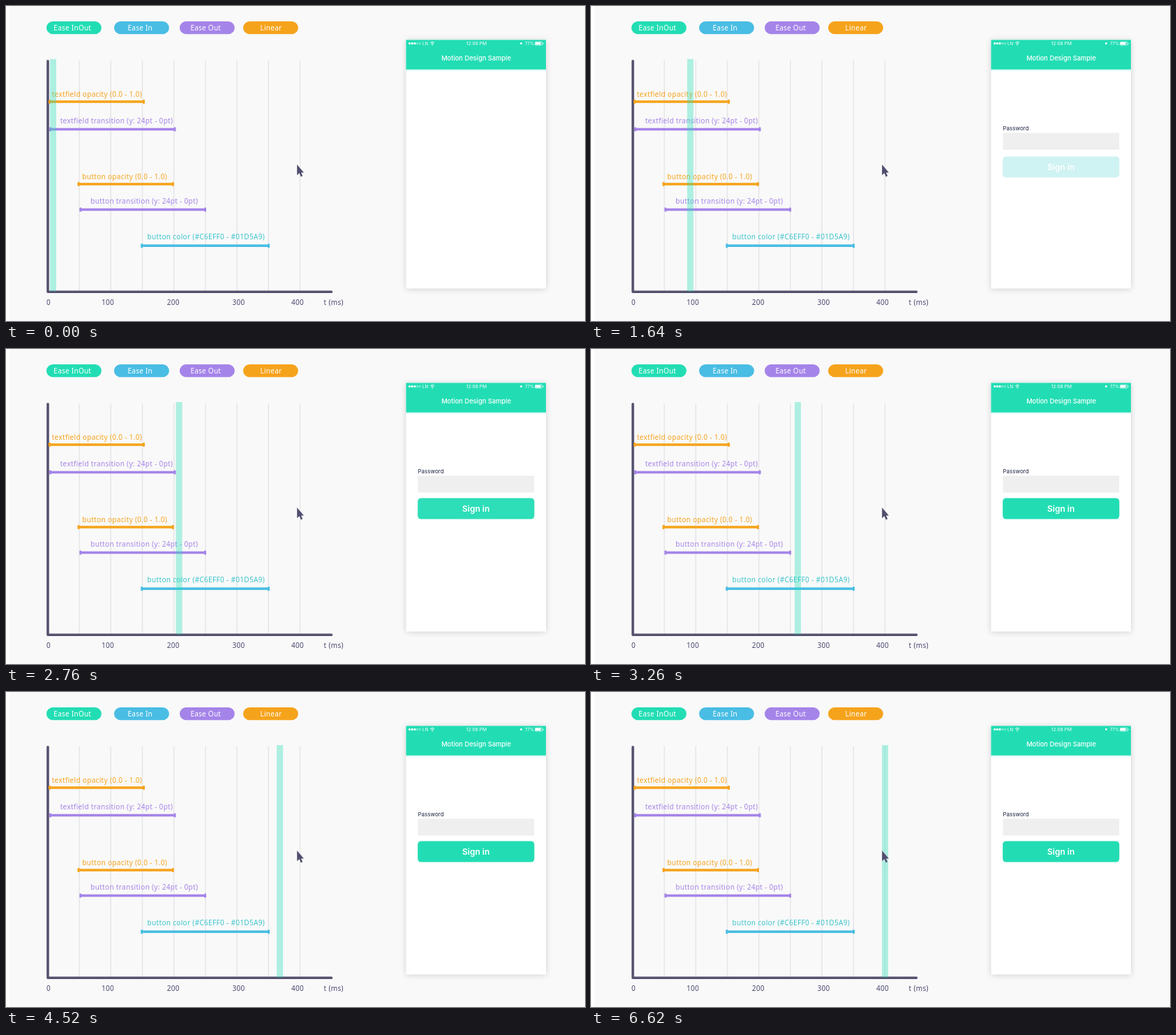
Write an HTML page that moves like this. It is 830 px wide and 451 px high and loops after 6640 ms.

```html
<!DOCTYPE html>
<html lang="en">
<head>
<meta charset="utf-8">
<title>Motion timeline</title>
<style>
  html, body { margin: 0; width: 100%; height: 100%; overflow: hidden; background: #fff; }
  svg { display: block; width: 830px; height: 451px; }
  text { white-space: pre; }
  .chart text { font: 400 10px "Noto Sans", "Open Sans", sans-serif; letter-spacing: .32px; }
  .chart .pill { font-weight: 500; letter-spacing: .25px; text-anchor: middle; fill: #fff; }
  .phone text { font-family: Inter, Roboto, sans-serif; }
  .phone .status { font-size: 6.7px; fill: #fff; }
  .card { filter: drop-shadow(0 1px 4px rgba(0, 0, 0, .16)); }
</style>
</head>
<body>
<svg viewBox="0 0 830 451">
  <rect x="5" width="825" height="451" fill="#f9f9f9"/>
  <g class="chart" id="chart"></g>

  <g class="phone">
    <rect class="card" x="573.5" y="48.5" width="200.5" height="356" fill="#fff"/>
    <rect x="573.5" y="90" width="200.5" height="3" fill="#22ddb4" opacity=".15"/>
    <rect x="573.5" y="48.5" width="200.5" height="42.3" fill="#22ddb4"/>
    <g fill="#fff" id="dots"></g>
    <text class="status" x="597" y="55.8" style="font-size:6.2px">LN</text>
    <g fill="none" stroke="#fff" stroke-width="1">
      <path d="M608.3 52.6q2.9-2.6 5.8 0M609.5 54.2q1.7-1.5 3.4 0"/>
    </g>
    <circle cx="611.2" cy="55.6" r=".8" fill="#fff"/>
    <text class="status" x="674.5" y="56" text-anchor="middle">12:08 PM</text>
    <circle cx="738.5" cy="53.5" r="1.5" fill="#fff"/>
    <text class="status" x="744" y="56" style="font-size:6.2px">77%</text>
    <rect x="758.4" y="51.4" width="10.4" height="4.6" rx="1" fill="none" stroke="#fff" stroke-width=".7"/>
    <rect x="759" y="52" width="7.6" height="3.4" fill="#fff"/>
    <rect x="769.6" y="52.8" width="1" height="1.8" fill="#fff"/>
    <text x="674" y="78.3" text-anchor="middle" font-size="9.3" font-weight="500" fill="#fff">Motion Design Sample</text>

    <g id="field">
      <text x="590.5" y="178" font-size="8" fill="#1c2340">Password</text>
      <rect x="590.5" y="181.5" width="166.7" height="24" fill="#efefef"/>
    </g>
    <g id="button">
      <rect id="face" x="590.2" y="213.4" width="167.2" height="30.2" rx="5"/>
      <text x="673.7" y="233" text-anchor="middle" font-size="12" font-weight="600" fill="#fff">Sign in</text>
    </g>
  </g>

  <rect id="head" y="76" width="9" height="332.5" fill="#22ddb4" opacity=".35"/>
  <path d="M417.2 227V242.2L420.5 239.3L422.8 244.4L425.2 243.3L423 238.5H427Z"
        fill="#504e6e" stroke="#fff" stroke-width="1" paint-order="stroke"/>
</svg>

<script>
const LOOP = 6640;
const TEAL = "#22ddb4", BLUE = "#49bde4", PURPLE = "#a584e9", ORANGE = "#f6a31c", INK = "#54526f";
const $ = id => document.getElementById(id);

function add(parent, tag, attrs, text) {
  const el = document.createElementNS("http://www.w3.org/2000/svg", tag);
  for (const key in attrs) el.setAttribute(key, attrs[key]);
  if (text) el.textContent = text;
  parent.append(el);
}

function drawChart() {
  const g = $("chart");
  const pills = [
    [58, 95.3, TEAL, "Ease InOut"], [155, 192.3, BLUE, "Ease In"],
    [249, 286.3, PURPLE, "Ease Out"], [340, 380, ORANGE, "Linear"]
  ];
  for (const [x, mid, fill, label] of pills) {
    add(g, "rect", { x, y: 22, width: 78.8, height: 18.3, rx: 9.15, fill });
    add(g, "text", { class: "pill", x: mid, y: 34.8 }, label);
  }

  for (let i = 0; i < 8; i++) {
    add(g, "rect", { x: 104.3 + i * 45.2, y: 78, width: 1.5, height: 330, fill: "#e6e6e8" });
  }
  add(g, "path", { d: "M60 78.8V409.3H466.5", fill: "none", stroke: INK,
    "stroke-width": 3.6, "stroke-linecap": "round", "stroke-linejoin": "round" });

  const ticks = [[58, "0"], [137, "100"], [230.7, "200"], [324.4, "300"], [409, "400"], [455.6, "t (ms)"]];
  for (const [x, label] of ticks) add(g, "text", { x, y: 428.4, fill: "#4a4870" }, label);

  const tracks = [
    [61, 199, 137, ORANGE, 65.7, 129.5, "textfield opacity (0.0 - 1.0)"],
    [62, 243.5, 176.5, PURPLE, 77.7, 167.5, "textfield transition (y: 24pt - 0pt)"],
    [102.5, 240.8, 255, ORANGE, 109.3, 247.6, "button opacity (0.0 - 1.0)"],
    [105.3, 287, 291.5, PURPLE, 121.2, 282.6, "button transition (y: 24pt - 0pt)"],
    [193.2, 378, 343.2, BLUE, 202.6, 334.4, "button color (#C6EFF0 - #01D5A9)"]
  ];
  for (const [from, to, y, fill, x, base, label] of tracks) {
    add(g, "rect", { x: from + 1, y: y - 1.8, width: to - from - 2, height: 3.6, fill });
    for (const cap of [from, to - 3]) {
      add(g, "rect", { x: cap, y: y - 3, width: 3, height: 6, rx: 1.2, fill });
    }
    add(g, "text", { x, y: base, fill: fill === BLUE ? "#3cc4cd" : fill }, label);
  }

  for (let i = 0; i < 5; i++) {
    const hollow = i > 2;
    add($("dots"), "circle", { cx: 578.6 + i * 3.7, cy: 53.6, r: hollow ? 1.2 : 1.6,
      ...(hollow && { fill: "none", stroke: "#fff", "stroke-width": .5 }) });
  }
}

// Playhead keys: time, centre x, speed in px per ms
const KEYS = [
  [0, 67.5, 0], [1640, 142.3, .0815], [2760, 248, .0965],
  [3740, 339.5, .083], [4520, 392.5, .054], [5480, 421.5, 0]
];

function headX(t) {
  const i = KEYS.findIndex(k => k[0] > t);
  if (i < 0) return KEYS[KEYS.length - 1][1];
  const [t0, x0, v0] = KEYS[i - 1], [t1, x1, v1] = KEYS[i];
  const d = t1 - t0, u = (t - t0) / d, w = 1 - u;
  return x0 * w * w * (1 + 2 * u) + x1 * u * u * (3 - 2 * u) + d * u * w * (v0 * w - v1 * u);
}

const ramp = (v, from, to) => Math.min(1, Math.max(0, (v - from) / (to - from)));
const easeIn = u => u * u;
const easeOut = u => 1 - (1 - u) ** 2;

function mix(a, b, u) {
  return `rgb(${a.map((v, i) => Math.round(v + (b[i] - v) * u))})`;
}

function place(el, opacity, progress) {
  el.setAttribute("opacity", opacity);
  el.setAttribute("transform", `translate(0 ${12.9 * (1 - progress)})`);
}

function render(t) {
  $("head").setAttribute("x", headX(t) - 4.5);
  // Phone clock, in the units of the time axis
  const p = (t - 520) * .153;
  place($("field"), ramp(p, 0, 150), easeOut(ramp(p, 0, 200)));
  place($("button"), ramp(p, 50, 200), easeOut(ramp(p, 50, 250)));
  $("face").setAttribute("fill", mix([198, 239, 240], [34, 221, 180], easeIn(ramp(p, 150, 350))));
}

drawChart();
const start = performance.now();
function tick() {
  render((performance.now() - start) % LOOP);
  requestAnimationFrame(tick);
}
tick();
</script>
</body>
</html>
```
